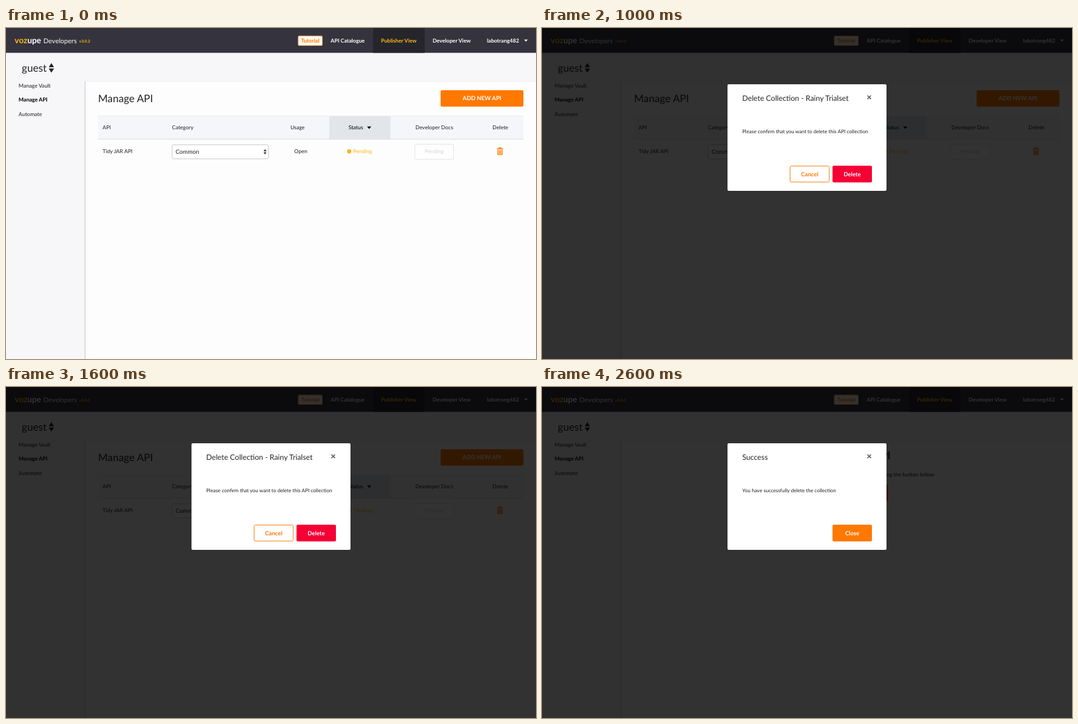
An HTML page for the animation above (3 s loop, 800 px wide and 500 px high).

```html
<!DOCTYPE html>
<html lang="en">
<head>
<meta charset="utf-8">
<title>Manage API</title>
<style>
  html, body { margin: 0; width: 100%; height: 100%; overflow: hidden; }
  svg { display: block; width: 800px; height: 500px; }
  text { font: 8.125px Lato, sans-serif; fill: #222; text-rendering: geometricPrecision; }
  .bold { font-weight: 700; }
  .nav text { font-weight: 700; fill: #fff; }
  .mid { text-anchor: middle; }
  .end { text-anchor: end; }
  .heading { font-size: 15.7px; }
  .title { font-size: 11.25px; }
  .note { font-size: 7.6px; }
  .button { font-size: 8.75px; font-weight: 700; text-anchor: middle; }
  text.white { fill: #fff; }
  text.orange { fill: #ff7800; }
  text.amber, .nav text.amber { fill: #fdb813; }
</style>
</head>
<body>
<svg viewBox="0 0 800 500">
  <rect width="800" height="500" fill="#f7f7f9"/>
  <rect x="119" y="80.5" width="681" height="420" fill="#e6e6ea"/>
  <rect x="118.8" y="81" width="1.2" height="419" fill="#cfcfd3"/>
  <rect x="120" y="81" width="680" height="419" fill="#fdfdfd"/>

  <g class="nav">
    <rect width="800" height="37.5" fill="#35343e"/>
    <rect x="554" width="78" height="37.5" fill="#26252c"/>
    <text x="13" y="22.5" style="font-size:12.5px"><tspan fill="#fdb813">voz</tspan>upe</text>
    <text x="56.5" y="22.5" style="font-size:10.1px;font-weight:400">Developers</text>
    <text x="110.5" y="22.3" class="amber" style="font-size:6px">v3.0.2</text>
    <rect x="441" y="12" width="36.5" height="14.5" rx="1.5" fill="#fff8ee" stroke="#ff9a3c" stroke-width=".8"/>
    <text x="459.2" y="22" class="mid" style="fill:#ff7800">Tutorial</text>
    <text x="490" y="22">API Catalogue</text>
    <text x="566" y="22" class="amber">Publisher View</text>
    <text x="644" y="22">Developer View</text>
    <text x="726" y="22">labotrang482</text>
    <path d="M782 17.5h5.6l-2.8 3z" fill="#fff"/>
  </g>

  <text x="23.8" y="65.6" class="heading">guest</text>
  <path d="M64.5 59.3h8l-4-6.3zM64.5 61.3h8l-4 6.3z" fill="#222"/>
  <text x="19" y="90">Manage Vault</text>
  <text x="19" y="111.2" class="bold" style="fill:#000">Manage API</text>
  <text x="19" y="132.5">Automate</text>

  <g id="list">
    <text x="139" y="112.3" class="heading">Manage API</text>
    <rect x="656" y="94" width="125" height="24.7" rx="2" fill="#ff7800"/>
    <text x="718.5" y="109.2" class="button white">ADD NEW API</text>

    <rect x="139" y="133" width="642" height="35" fill="#f5f6fa"/>
    <rect x="488" y="133" width="92.5" height="35" fill="#e2e5ea"/>
    <path d="M139 133h642" stroke="#e3e5ea" stroke-width=".8"/>
    <path d="M139 168h642" stroke="#d9dce1"/>
    <g class="bold">
      <text x="145.7" y="153">API</text>
      <text x="250.5" y="153">Category</text>
      <text x="440" y="153" class="mid">Usage</text>
      <text x="517" y="153" style="fill:#000">Status</text>
      <text x="646.5" y="153" class="mid">Developer Docs</text>
      <text x="746.2" y="153" class="mid">Delete</text>
    </g>
    <path d="M545 148.7h6.4l-3.2 3.8z" fill="#000"/>

    <text x="145.7" y="189.3">Tidy JAR API</text>
    <rect x="250.8" y="176.3" width="145.4" height="21.4" rx="2.5" fill="#fff" stroke="#bfc0c4" stroke-width=".8"/>
    <text x="256" y="190" style="font-size:8.9px">Common</text>
    <path d="M388.8 186.2h4.4l-2.2-3.2zM388.8 187.8h4.4l-2.2 3.2z" fill="#333"/>
    <text x="445" y="189.3" class="mid">Open</text>
    <circle cx="518" cy="186.4" r="3.1" fill="#fdb022"/>
    <text x="524" y="189.3" class="amber">Pending</text>
    <rect x="617" y="175.5" width="58.6" height="22.8" rx="1.5" fill="#fefefe" stroke="#dfe0e5" stroke-width=".8"/>
    <text x="646.3" y="189.3" class="mid" style="fill:#d3d5dc">Pending</text>
    <path d="M741 182.7h9.4M744 182.4v-1.6h3.4v1.6M742.5 184v7.2h6.4V184M744.7 184.5v5.5M746.7 184.5v5.5" fill="none" stroke="#ff7800" stroke-width="1.3"/>
  </g>

  <g id="empty">
    <text x="526" y="108.8" class="heading bold end">Add an API</text>
    <text x="592" y="135" class="end">Start by clicking the button below</text>
    <rect x="397.5" y="147.3" width="125" height="24.7" rx="2" fill="#ff7800"/>
    <text x="460" y="162.5" class="button white">ADD NEW API</text>
  </g>

  <g id="dialog">
    <rect width="800" height="500" opacity=".8"/>
    <rect x="280" y="85" width="240" height="161" rx="2" fill="#fff"/>
    <path d="M491.2 102l5.4 5.4M496.6 102l-5.4 5.4" stroke="#666" stroke-width="1.6"/>
    <g id="confirm">
      <text x="302.3" y="110.3" class="title">Delete Collection - Rainy Trialset</text>
      <text x="302.3" y="159.2" class="note">Please confirm that you want to delete this API collection</text>
      <rect x="374.5" y="208.5" width="59" height="24.2" rx="2" fill="#fff" stroke="#f58a1f"/>
      <text x="404" y="223.6" class="button orange">Cancel</text>
      <rect x="438.5" y="208" width="59.5" height="25.2" rx="2" fill="#f50035"/>
      <text x="468.2" y="223.6" class="button white">Delete</text>
    </g>
    <g id="success">
      <text x="302.3" y="110.3" class="title">Success</text>
      <text x="302.3" y="159.2" class="note">You have successfully delete the collection</text>
      <rect x="438.5" y="208" width="59.5" height="25.2" rx="2" fill="#ff7800"/>
      <text x="468.2" y="223.6" class="button white">Close</text>
    </g>
  </g>
</svg>
<script>
  const show = (id, on) => {
    document.getElementById(id).style.display = on ? '' : 'none';
  };

  function draw(now) {
    const step = Math.floor(now / 1000) % 3;
    show('list', step < 2);
    show('empty', step === 2);
    show('dialog', step > 0);
    show('confirm', step === 1);
    show('success', step === 2);
  }

  const start = performance.now();
  function tick() {
    draw(performance.now() - start);
    requestAnimationFrame(tick);
  }
  tick();
</script>
</body>
</html>
```
